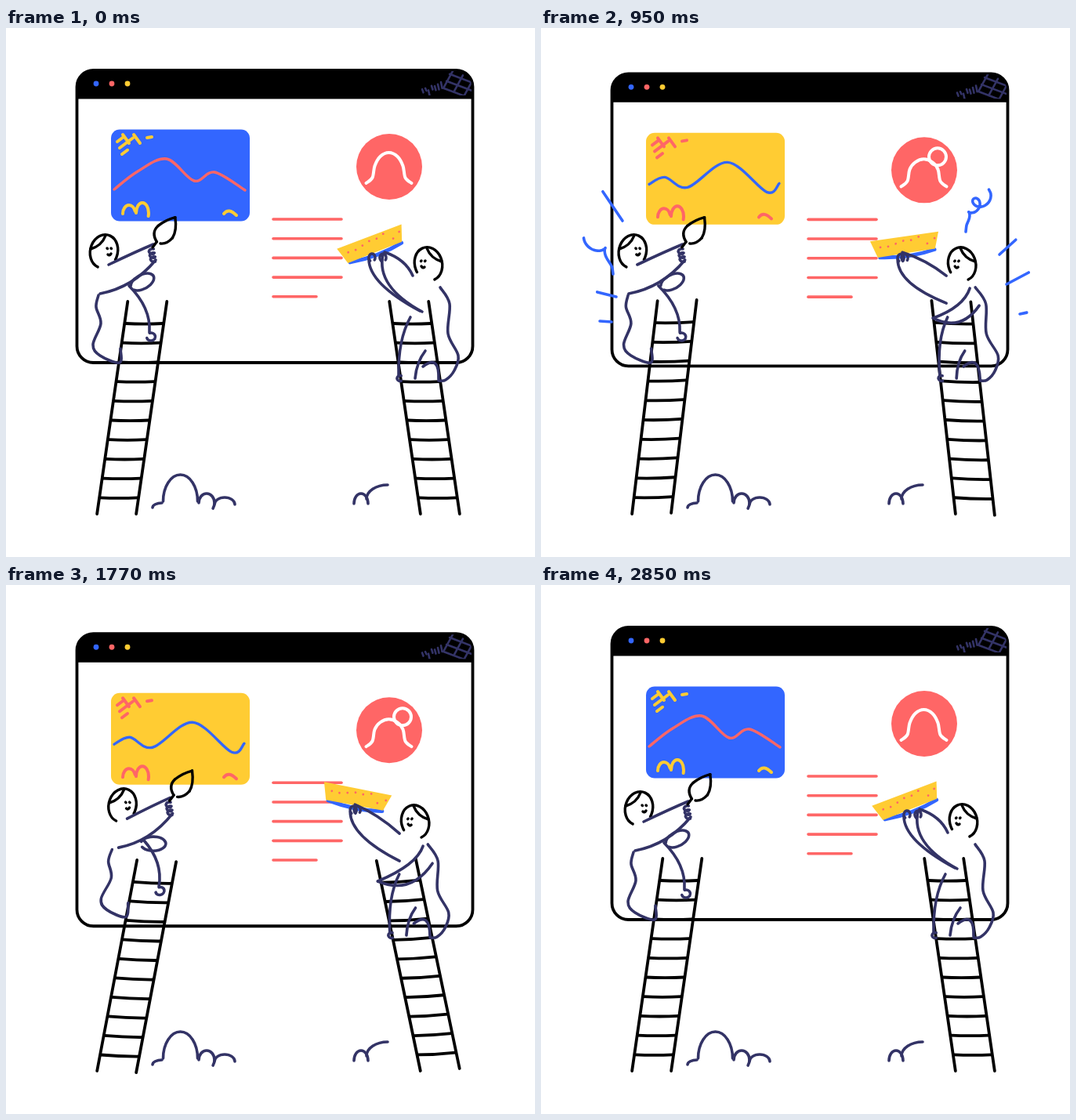
An HTML page with a canvas for the animation above (2.91 s loop, 675 by 675 pixels).

```html
<!DOCTYPE html>
<html lang="en">
<head>
<meta charset="utf-8">
<title>Page builders</title>
<style>
  html, body { margin: 0; width: 100%; height: 100%; overflow: hidden; background: #fff; }
  canvas { display: block; }
</style>
</head>
<body>
<canvas id="stage" width="675" height="675"></canvas>
<script>
const ctx = document.getElementById('stage').getContext('2d');
const BLACK = '#000', BLUE = '#3366ff', RED = '#ff6666', YELLOW = '#ffcc33', NAVY = '#333366';
const STEP = 190 / 3, HALF = 23, FRAMES = 46, LOOP = 2910, PI = Math.PI;

const lerp = (a, b, u) => a + (b - a) * u;
const clamp = u => Math.max(0, Math.min(1, u));
const ramp = (t, from, to) => clamp((t - from) / (to - from));
const smooth = (t, from, to) => { const u = ramp(t, from, to); return u * u * (3 - 2 * u); };
const hold = (t, a, b, c, d) => smooth(t, a, b) * (1 - smooth(t, c, d));

// Motion rules over one half of the loop
const windowDrop = t => 10.5 * Math.sin(PI * ramp(t, 0, 1100));
const ladderLean = t => smooth(t, 160, 530) * lerp(1, -.22, smooth(t, 705, 960)) + .22 * smooth(t, 980, 1300);
const washerReach = t => hold(t, 230, 510, 755, 970);
const lineScroll = t => 3 * smooth(t, 600, 760) - 31.7 * smooth(t, 765, 950) + 4 * smooth(t, 950, 1100);

function random(seed) {
  const v = Math.sin(seed * 127.1) * 43758.5453;
  return v - Math.floor(v);
}

function pen(color = BLACK, width = 3.4) {
  ctx.strokeStyle = color;
  ctx.lineWidth = width;
}

// Smooth line through [x, y] points
function curve(points) {
  const at = i => points[Math.max(0, Math.min(points.length - 1, i))];
  ctx.beginPath();
  ctx.moveTo(...points[0]);
  for (let i = 0; i < points.length - 1; i++) {
    const [a, b, c, d] = [at(i - 1), at(i), at(i + 1), at(i + 2)];
    ctx.bezierCurveTo(
      b[0] + (c[0] - a[0]) / 6, b[1] + (c[1] - a[1]) / 6,
      c[0] - (d[0] - b[0]) / 6, c[1] - (d[1] - b[1]) / 6, ...c);
  }
  ctx.stroke();
}

function bend(x1, y1, cx, cy, x2, y2) {
  ctx.beginPath();
  ctx.moveTo(x1, y1);
  ctx.quadraticCurveTo(cx, cy, x2, y2);
  ctx.stroke();
}

const line = (x1, y1, x2, y2) => bend(x1, y1, x1, y1, x2, y2);

function arc(x, y, rx, ry, from = 0, to = 2 * PI, turn = 0) {
  ctx.beginPath();
  ctx.ellipse(x, y, rx, ry, turn, from, to);
  ctx.stroke();
}

function disc(x, y, r, color) {
  ctx.fillStyle = color;
  ctx.beginPath();
  ctx.arc(x, y, r, 0, 2 * PI);
  ctx.fill();
}

function box(x, y, w, h, r, color) {
  ctx.fillStyle = color;
  ctx.beginPath();
  ctx.roundRect(x, y, w, h, r);
  ctx.fill();
}

function placed(x, y, draw, degrees = 0, flip = 1) {
  ctx.save();
  ctx.translate(x, y);
  ctx.rotate(degrees * PI / 180);
  ctx.scale(flip, 1);
  draw();
  ctx.restore();
}

// Shear a body so that its hips and head shift by different amounts
function leaning(hipY, headY, hipShift, headShift, lift, draw) {
  const slope = (headShift - hipShift) / (headY - hipY);
  ctx.save();
  ctx.transform(1, 0, slope, 1, hipShift - slope * hipY, lift);
  draw();
  ctx.restore();
}

function bushes() {
  pen(NAVY, 3.6);
  arc(199, 612, 12, 6, PI, 1.5 * PI);
  arc(222.5, 604, 22, 34, PI, 2 * PI);
  arc(256, 606, 10, 12, PI, 2.2 * PI);
  arc(279, 608, 13, 9, PI, 2 * PI);
  arc(453, 607, 9, 13, PI, 2 * PI);
  arc(487, 601, 27, 18, PI, 1.5 * PI);
}

function headerScribble() {
  ctx.save();
  ctx.beginPath();
  ctx.roundRect(526, 55, 68, 31, [0, 19, 0, 0]);
  ctx.clip();
  pen(NAVY, 2.6);
  for (let i = 0; i < 7; i++) {
    const x = 531 + 4 * i, y = 66 + 15 * random(i + 2);
    line(x, y, x + 1.5, y + 3 + 5 * random(i + 9));
  }
  placed(573, 68, () => {
    for (const d of [-8, 6, 20]) {
      line(d, -11, d - 2, 13);
      line(-10, d * .7, 24, d * .7 - 2);
    }
  }, 24);
  ctx.restore();
}

function browser() {
  box(90, 53, 506, 374, 21, '#fff');
  box(90, 53, 506, 37.5, [21, 21, 0, 0], BLACK);
  pen(BLACK, 3.8);
  ctx.beginPath();
  ctx.roundRect(90.5, 54, 505, 373, 21);
  ctx.stroke();
  [BLUE, RED, YELLOW].forEach((c, i) => disc(115 + 20 * i, 71, 3.4, c));
  headerScribble();
}

function chartCard(fill, graph, ink, morph) {
  box(134, 129.5, 177, 117, 11, fill);
  const calm = [[138, 206], [168, 183], [205, 167], [240, 195], [266, 184], [305, 207]];
  const wavy = [[138, 195], [158, 186], [187, 199], [238, 167], [288, 205], [304, 194]];
  pen(graph, 3.4);
  curve(calm.map(([x, y], i) => [lerp(x, wavy[i][0], morph), lerp(y, wavy[i][1], morph)]));

  pen(ink, 4);
  for (let i = 0; i < 3; i++) {
    const x = 142 + 3 * i, y = 145 + 8 * i, reach = i === 1 ? 17 : 7;
    line(x, y, x + reach, y - reach * .75);
  }
  for (const x of [149, 163]) line(x, 136, x + 8, 147);
  line(180, 140, 186, 139);
  arc(157, 237, 8, 11, PI, 1.9 * PI);
  arc(174, 236, 8, 13, PI, 2.1 * PI);
  bend(278, 237, 284, 229, 294, 239);
}

function avatar(bun) {
  disc(489, 177, 42, RED);
  const half = [[29, 21], [21, 14], [18, -1], [11, -13 + 3 * bun]];
  pen('#fff', 4);
  placed(488.5, 177, () => curve([
    ...half.map(([x, y]) => [-x, y]), [0, -18 + 4 * bun], ...half.reverse()]));
  if (bun > .02) arc(506, 160, 11 * bun, 11 * bun);
}

function textLines(t) {
  const added = ramp(t, 380, 590), scroll = lineScroll(t);
  pen(RED, 3.6);
  for (let i = 0; i < 6; i++) {
    if (i === 0 && scroll < -20) continue;
    const end = i < 4 ? 428 : i === 4 ? lerp(396, 428, added) : lerp(340, 396, added);
    const y = 244 + 24.7 * i + (i ? scroll : 0);
    if (end > 341) line(341, y, end, y);
  }
}

function ladder(foot, slant, degrees) {
  placed(foot, 621, () => {
    pen(BLACK, 3.8);
    const rail = y => -slant * y / 270;
    for (const x of [0, 50]) line(rail(-272) + x, -272, rail(-1) + x, -1);
    for (let y = -244; y < 0; y += 24.7) bend(rail(y) + 1, y, rail(y) + 25, y + 1.2, rail(y) + 49, y);
  }, degrees);
}

function head(x, y, side) {
  placed(x, y, () => {
    pen();
    arc(0, 0, 17.5, 21.5, .55 * PI, 2.1 * PI, .25);
    bend(2, -20, -3, -7, -17, -3);
    for (const eye of [4, 9]) line(eye, -4, eye + .5, -3.5);
    bend(5, 4, 7, 6, 9, 3);
  }, 0, side);
}

function trowel(x, y, degrees) {
  placed(x, y, () => {
    pen();
    line(0, 0, 0, -9);
    bend(0, -9, -13, -14, -11, -26);
    bend(-11, -26, -8, -38, 0, -48);
    bend(0, -48, 12, -36, 13, -25);
    bend(13, -25, 12, -14, 5, -10);
  }, degrees);
}

function painter(t, lean) {
  const reach = Math.max(0, lean);
  const shift = 38 * lean + 23 * reach;
  const x = 125 + shift, y = 285 - 10 * reach;
  const handX = 187 + 34 * lean + 22 * reach, handY = 278 - 12 * reach;

  head(x, y, 1);
  bend(x + 6, y + 17, lerp(x, handX, .65), lerp(y, handY, .65) + 5, handX + 1, handY - 2);
  bend(x - 5, y + 54, lerp(x, handX, .6), y + 46, handX + 4, handY + 18);
  for (let i = 0; i < 3; i++) arc(handX + i, handY + 7 + 5 * i, 4.5, 3.2, .4 * PI, 1.6 * PI);
  trowel(handX, handY + 2, 37 - 15 * hold(t, 380, 500, 560, 700));

  placed(174 + 30 * lean + 6 * reach, 324 + 16 * reach, () => arc(0, 0, 16, 9, -.9 * PI, .85 * PI), -28 + 72 * reach);
  leaning(410, 285, 25 * lean, shift, -9 * reach, () => {
    curve([[118, 341], [115, 356], [121, 377], [111, 404], [120, 418], [145, 427], [146, 409]]);
    bend(157, 329, 185, 357, 183, 388);
    arc(185, 394, 5.5, 5, -.6 * PI, .9 * PI);
  });
}

function sponge(x, y, degrees) {
  placed(x, y, () => {
    pen(BLUE, 5);
    bend(-34, 12, 4, 18, 36, 11);
    ctx.fillStyle = YELLOW;
    ctx.beginPath();
    for (const [px, py] of [[-44, -10], [44, -11], [37, 10], [-37, 12]]) ctx.lineTo(px, py);
    ctx.fill();
    for (let i = 0; i < 8; i++) disc(-32 + 10 * i, -8 + 14 * random(i + 5), 1.4, RED);
  }, degrees);
}

function washer(t, lean) {
  const reach = washerReach(t);
  const x = 539 - 74 * reach, y = 301 + 5 * reach;
  const lift = Math.sin(PI * ramp(t, 80, 520));
  const spongeX = 467 - 88 * reach;
  const spongeY = 276 - 7 * lift + reach * (5 + 9 * ramp(t, 500, 760));
  sponge(spongeX, spongeY, -20 + 32 * smooth(t, 60, 320) - 32 * ramp(t, 320, 1350));
  head(x, y, -1);

  const grip = hold(t, 90, 290, 980, 1230);
  const handX = spongeX - 6 * grip + 10 * reach, handY = spongeY + 13;
  const spread = 14 * (1 - grip);
  bend(handX + spread + 2, handY - 3, lerp(handX, x, .4) + spread, lerp(handY, y, .5), x - 20, y + 15);
  bend(handX - 4, handY + 6, handX - 4, handY + 37, lerp(x - 11, x - 20, grip), y + lerp(60, 50, grip));
  for (let i = 0; i < 2; i++) arc(handX + i * Math.max(5, spread), handY + 4, 4, 5, .7 * PI, 2.2 * PI);

  // The second arm lets go of the sponge and holds on to the ladder
  const gripX = 491 - 43 * lean, gripY = 373 + 13 * lean;
  bend(lerp(531, x + 10, grip), lerp(362, y + 31, grip),
    lerp(472, x + 2, grip), lerp(330, y + 55, grip),
    lerp(handX + spread, gripX, grip), lerp(handY, gripY, grip));
  if (grip > .1) {
    const tipX = lerp(gripX, x + 22, grip), tipY = lerp(gripY, y + 53, grip);
    bend(gripX, gripY, lerp(gripX, tipX, .6), gripY + 18 * grip, tipX, tipY);
  }

  leaning(425, 302, -31 * lean, -74 * reach, 0, () => {
    curve([[554, 331], [566, 352], [564, 390], [577, 418], [572, 437], [561, 449], [552, 450]]);
    bend(516, 369, 500, 398, 501, 444);
    arc(503, 447, 4, 3.5, .4 * PI, 1.6 * PI);
    bend(535, 412, 524, 426, 522, 447);
    bend(532, 432, 553, 416, 552, 448);
  });
}

function burst(t) {
  if (t < 810 || t > 1190) return;
  const grow = Math.sqrt(ramp(t, 800, 950)), fade = ramp(t, 950, 1200);
  const travel = 42 * (1 - (1 - fade) ** 2);
  pen(BLUE, 3.6);

  const streak = (x, y, degrees, length) => placed(x, y,
    () => line(travel + length * fade * .9, 0, travel + length * grow, 0), degrees);
  streak(104, 246, -124, 45);
  streak(96, 343, -166, 25);
  streak(90, 375, -176, 15);
  streak(585, 289, -42, 28);
  streak(594, 327, -28, 32);
  streak(611, 365, -12, 9);

  const coil = (x1, y1, x2, y2, radius, turns, outX, outY) => {
    const points = [];
    for (let i = 0; i <= 30; i++) {
      const u = lerp(fade * .8, grow, i / 30), angle = 2 * PI * turns * u;
      points.push([
        lerp(x1, x2, u) + radius * u * Math.sin(angle) + outX * travel,
        lerp(y1, y2, Math.sqrt(u)) + radius * u * Math.cos(angle) + outY * travel]);
    }
    curve(points);
  };
  coil(92, 314, 64, 271, 10, -1.3, -.9, -.35);
  coil(542, 260, 565, 215, 11, 2.4, .6, -.75);
}

function draw(ms) {
  const n = Math.min(FRAMES - 1, Math.floor((ms + 3.4) / STEP));
  const half = n < HALF ? 0 : 1, t = (n % HALF) * STEP;
  const drop = windowDrop(t), lean = ladderLean(t);
  const warm = (half + (t > 640 ? 1 : 0)) % 2;
  const toward = u => lerp(half, 1 - half, u);

  ctx.fillStyle = '#fff';
  ctx.fillRect(0, 0, 675, 675);
  ctx.lineCap = ctx.lineJoin = 'round';

  bushes();
  placed(0, drop, () => {
    browser();
    avatar(toward(smooth(t, 560, 750)));
    textLines(t);
  });
  const sag = 4 * hold(t, 380, 500, 540, 700);
  const colors = warm ? [YELLOW, BLUE, RED] : [BLUE, RED, YELLOW];
  placed(0, drop + sag, () => chartCard(...colors, toward(smooth(t, 430, 760))));

  ladder(116, 39, 0 + 6.5 * lean);
  ladder(529, -39.5, -9 * lean);
  painter(t, lean);
  washer(t, lean);
  burst(t);
}

function tick() {
  draw(performance.now() % LOOP);
  requestAnimationFrame(tick);
}
tick();
</script>
</body>
</html>
```
